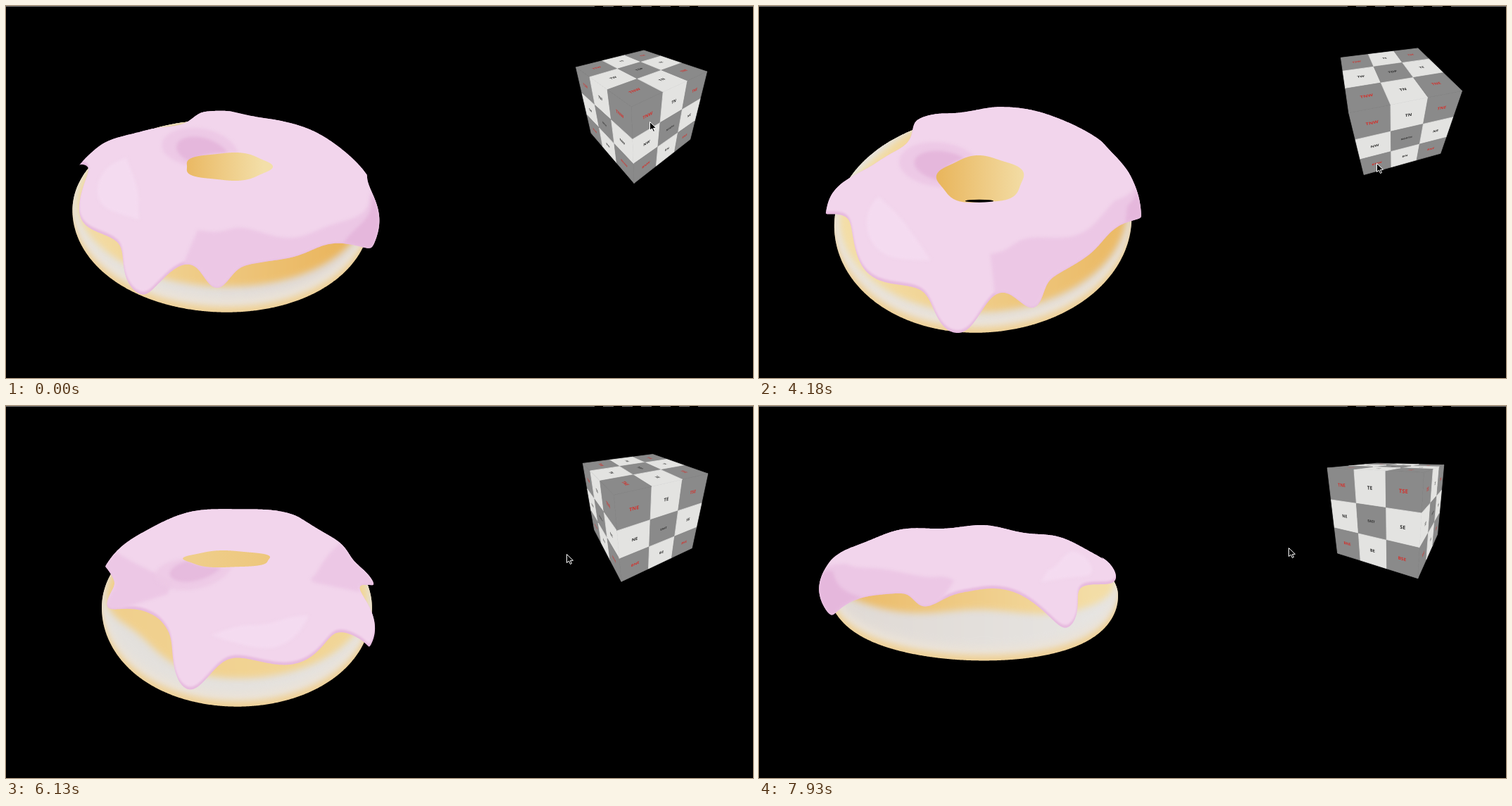
Animation, 1061 px wide and 528 px high, one loop 8 s. Source, as an HTML page with a canvas:

```html
<!DOCTYPE html>
<html lang="en">
<head>
<meta charset="utf-8">
<title>Doughnut viewer</title>
<style>
html, body { margin: 0; width: 100%; height: 100%; overflow: hidden; background: #000; }
canvas { display: block; width: 1061px; height: 528px; }
</style>
</head>
<body>
<canvas id="stage" width="1061" height="528"></canvas>
<script>
const ctx = document.getElementById('stage').getContext('2d');
const LOOP = 8000, REFRESH = 128.1, DRAG = 3190;

// time, cube yaw, cube pitch, doughnut tilt
const VIEW = [[3060, -4.9, 35, 39], [3550, -12.3, 39.5, 45], [4840, -51, 38, 46],
  [5620, -80.8, 35, 42], [6640, -130, 25.2, 25.5], [7930, -160, 18, 17]];
// time, x, y
const POINTER = [[290, 914, 164], [910, 854, 293], [1180, 848, 283], [1300, 848, 283], [1670, 871, 233],
  [2090, 872, 234], [2360, 880, 239], [2750, 904, 218], [3060, 902, 219], [3550, 894, 225],
  [4840, 854, 220], [6640, 774, 206], [7930, 752, 201]];

const RAD = Math.PI / 180;
const sin = deg => Math.sin(deg * RAD);
const cos = deg => Math.cos(deg * RAD);
const lerp = (a, b, u) => a + (b - a) * u;
const clamp = u => Math.min(1, Math.max(0, u));

function track(keys, t) {
  let i = 0;
  while (i < keys.length - 2 && t >= keys[i + 1][0]) i++;
  const a = keys[i], b = keys[i + 1];
  const u = clamp((t - a[0]) / (b[0] - a[0]));
  return a.map((v, k) => lerp(v, b[k], u));
}

// Smooth bump on the circle of angles
function bump(angle, centre, width) {
  const d = ((angle - centre) % 360 + 540) % 360 - 180;
  return Math.exp(-(d * d) / (width * width));
}

// Around the ring: centre, depth and width of each icing drip
const DRIPS = [[-176, 25, 9], [-119, 55, 9], [-74, 18, 18], [-34, 65, 10], [-2, 28, 7], [76, 65, 16], [127, 75, 22]];
const rimBase = a => 55 + 22 * bump(a, -152, 24);
const rim = a => DRIPS.reduce((t, [c, depth, w]) => t - depth * bump(a, c, w), rimBase(a));

// Cross sections: half width, half height above and below the middle
const RING = 135;
const BUN = { w: 67, up: 40, low: 57, wave: 0 };
const ICING = { w: 80, up: 52, low: 52, wave: 3 };

function mix(a, b, u) {
  const part = (c, i) => parseInt(c.slice(i, i + 2), 16);
  return 'rgb(' + [1, 3, 5].map(i => Math.round(lerp(part(a, i), part(b, i), u))) + ')';
}

function drawDoughnut(yaw, tilt) {
  const turn = -(yaw + 4.9);
  const s = sin(tilt), c = cos(tilt);
  const cx = 298 + 33 * cos(turn - 76), cy = 242 + 1.33 * tilt;

  // a: angle around the ring, t: angle around the cross section
  const point = (body, a, t) => {
    const r = (RING + body.w * cos(t)) * (1 + 0.05 * cos(2 * (a + 100)));
    const h = t < 0 ? body.low : body.up + body.wave * cos(9 * (a - 19));
    return [cx + r * sin(a + turn), cy + r * cos(a + turn) * s - h * sin(t) * c];
  };
  // Section angle at which the surface turns out of sight
  const limb = (body, a) => {
    const front = cos(a + turn), h = front > 0 ? body.low : body.up;
    return Math.atan2(-front * c * h, body.w * s) / RAD;
  };
  const polygon = pts => {
    const path = new Path2D();
    pts.forEach(p => path.lineTo(...p));
    path.closePath();
    return path;
  };
  const sweep = (from, to, f) => {
    const n = Math.round(Math.abs(to - from) * 2);
    return Array.from({ length: n + 1 }, (_, i) => f(lerp(from, to, i / n), i / n));
  };
  const outline = (body, floor) =>
    polygon(sweep(0, 360, a => point(body, a, Math.max(limb(body, a), floor(a)))));
  const edge = a => Math.max(limb(ICING, a), rim(a));
  const patch = (from, to, low, high) => polygon([
    ...sweep(from, to, (a, u) => point(ICING, a, Math.max(edge(a), low(a, u)))),
    ...sweep(to, from, (a, u) => point(ICING, a, Math.max(edge(a), high(a, u))))]);

  const paint = (path, fill, blur = 0, dy = 0, alpha = 1) => {
    ctx.save();
    ctx.translate(0, dy);
    ctx.globalAlpha = alpha;
    ctx.filter = blur ? `blur(${blur}px)` : 'none';
    ctx.fillStyle = fill;
    ctx.fill(path);
    ctx.restore();
  };
  const inside = (path, draw) => {
    ctx.save();
    ctx.clip(path);
    draw();
    ctx.restore();
  };
  // Light comes from -90 degrees on the ring
  const ramp = (light, dark, half, side) => {
    const g = ctx.createLinearGradient(cx - half, 0, cx + half, 0);
    [-side, side].forEach((phi, i) => g.addColorStop(i, mix(light, dark, 0.5 - 0.5 * cos(phi - turn + 90))));
    return g;
  };

  const bun = outline(BUN, () => -90);
  paint(bun, '#efd29a');
  inside(bun, () => {
    paint(bun, '#ebe3d8', 4, -8);
    paint(bun, ramp('#e6e4e1', '#ded7d2', 170, 60), 6, -20);
    paint(outline(BUN, a => rimBase(a) - 30), ramp('#f3dda6', '#e9b258', 170, 60), 5);
  });

  const holeY = 150 + 2 * tilt, holeH = Math.max(0, (tilt - 25.5) * 1.45);
  const open = clamp((tilt - 25.5) / 10);
  const around = (a, x, y) => [315 + x * sin(a + turn), holeY + y * cos(a + turn)];
  const dimple = (from, to, size) => polygon([
    ...sweep(from, to, a => around(a, 56, holeH)),
    ...sweep(to, from, (a, u) => around(a, 56 + size * sin(180 * u), holeH + size * 0.6 * sin(180 * u)))]);

  const icing = outline(ICING, rim);
  paint(icing, '#e7badf');
  inside(icing, () => {
    paint(icing, '#f2d5ec', 1.5, -4);
    const shade = high => a => high(a) - 90 * Math.max(0, -cos(a + turn));
    paint(patch(-18, 190, () => -90, shade(a => 78 + 38 * cos(2 * a) + 5 * sin(7 * a))), '#ecc7e5', 2);
    paint(patch(50, 150, () => -90, shade(a => 35 + 5 * sin(7 * a))), '#e5b7dc', 2);
    paint(patch(-115, -55, (a, u) => 85 - 20 * sin(180 * u), (a, u) => 85 + 20 * sin(180 * u)), '#f4dbf0', 2);
    paint(dimple(-195, -95, 72), '#edc9e6', 2, 0, open);
    paint(dimple(-180, -110, 50), '#e5b7dc', 2, 0, open);
  });

  if (holeH > 0) {
    const hole = polygon(sweep(0, 360, a => {
      const k = 1 + 0.05 * sin(5 * a);
      return around(a, 61 * k, holeH * k);
    }));
    paint(hole, ramp('#f3dfa9', '#e9b55c', 60, -90));
    const gap = clamp((tilt - 43) / 2);
    const pit = new Path2D();
    pit.ellipse(313, holeY + holeH - 3, 20 * gap, 2 * gap, 0, 0, 7);
    paint(pit, '#000');
  }
}

function drawCube(yaw, pitch) {
  const s = sin(pitch), c = cos(pitch);
  const project = ([x, h, y]) => {
    const k = 234 / (4.12 - h * c - y * s);
    return [900 + x * k, 144 - (y * c - h * s) * k];
  };
  const dir = deg => [sin(yaw + deg), cos(yaw + deg), 0];
  const ring = ['NW', 'N', 'NE', 'E', 'SE', 'S', 'SW', 'W'];
  const faces = ['NORTH', 'EAST', 'SOUTH', 'WEST'].map((title, i) => {
    const cols = [0, 1, 2].map(k => ring[(i * 2 + k) % 8]);
    return { n: dir(45 + i * 90), r: dir(135 + i * 90), d: [0, 0, -1],
      text: [...cols.map(k => 'T' + k), cols[0], title, cols[2], ...cols.map(k => 'B' + k)] };
  });
  faces.push({ n: [0, 0, 1], r: dir(135), d: dir(45),
    text: ['TSW', 'TS', 'TSE', 'TW', 'TOP', 'TE', 'TNW', 'TN', 'TNE'] });

  ctx.font = 'bold 20px "Open Sans", Arial, sans-serif';
  ctx.textAlign = 'center';
  ctx.textBaseline = 'middle';
  ctx.lineWidth = 0.8;
  for (const { n, r, d, text } of faces) {
    const at = (u, v) => project(n.map((k, i) => k + r[i] * u + d[i] * v));
    const o = at(-1, -1), p = at(1, -1), q = at(-1, 1);
    if ((p[0] - o[0]) * (q[1] - o[1]) <= (p[1] - o[1]) * (q[0] - o[0])) continue;
    text.forEach((label, i) => {
      const col = i % 3, row = (i - col) / 3;
      const u = (col - 1) * 2 / 3, v = (row - 1) * 2 / 3, e = 1 / 3;
      ctx.beginPath();
      for (const [x, y] of [[-e, -e], [e, -e], [e, e], [-e, e]]) ctx.lineTo(...at(u + x, v + y));
      ctx.closePath();
      ctx.fillStyle = ctx.strokeStyle = i % 2 ? '#e3e3e1' : '#8a8a8a';
      ctx.fill();
      ctx.stroke();
      const m = at(u, v), x = at(u + 0.1, v), y = at(u, v + 0.1);
      const em = label.length > 3 ? 0.035 : 0.048;
      ctx.save();
      ctx.transform((x[0] - m[0]) * em, (x[1] - m[1]) * em, (y[0] - m[0]) * em, (y[1] - m[1]) * em, m[0], m[1]);
      ctx.fillStyle = i % 2 || i === 4 ? '#2a2a2a' : '#d2322d';
      ctx.fillText(label, 0, 0);
      ctx.restore();
    });
  }
}

function drawPointer(x, y) {
  ctx.save();
  ctx.translate(Math.round(x) + 0.5, Math.round(y) + 0.5);
  ctx.beginPath();
  for (const p of [[0, 0], [0, 12], [3, 9.5], [5, 14], [7, 13], [5, 9], [9, 8.7]]) ctx.lineTo(...p);
  ctx.closePath();
  ctx.fillStyle = '#000';
  ctx.strokeStyle = '#fff';
  ctx.lineWidth = 1;
  ctx.fill();
  ctx.stroke();
  ctx.restore();
}

function draw(time) {
  // The view refreshes in even steps
  const t = DRAG + Math.floor((time - DRAG) / REFRESH + 0.2) * REFRESH;
  ctx.fillStyle = '#000';
  ctx.fillRect(0, 0, 1061, 528);
  ctx.fillStyle = '#7c7c7c';
  ctx.fillRect(0, 0, 1061, 1);
  ctx.fillStyle = '#000';
  for (let i = 0; i < 6; i++) ctx.fillRect(836 + 27 * i, 0, 12, 1);

  const [, yaw, pitch, tilt] = track(VIEW, t);
  const lift = 3 * Math.sin(Math.PI * clamp((t - VIEW[1][0]) / (VIEW[2][0] - VIEW[1][0])));
  const [, x, y] = track(POINTER, t);
  drawDoughnut(yaw, tilt + lift);
  drawCube(yaw, pitch + lift);
  drawPointer(x, y);
}

const start = performance.now();
function loop() {
  draw((performance.now() - start) % LOOP);
  requestAnimationFrame(loop);
}
loop();
</script>
</body>
</html>
```
